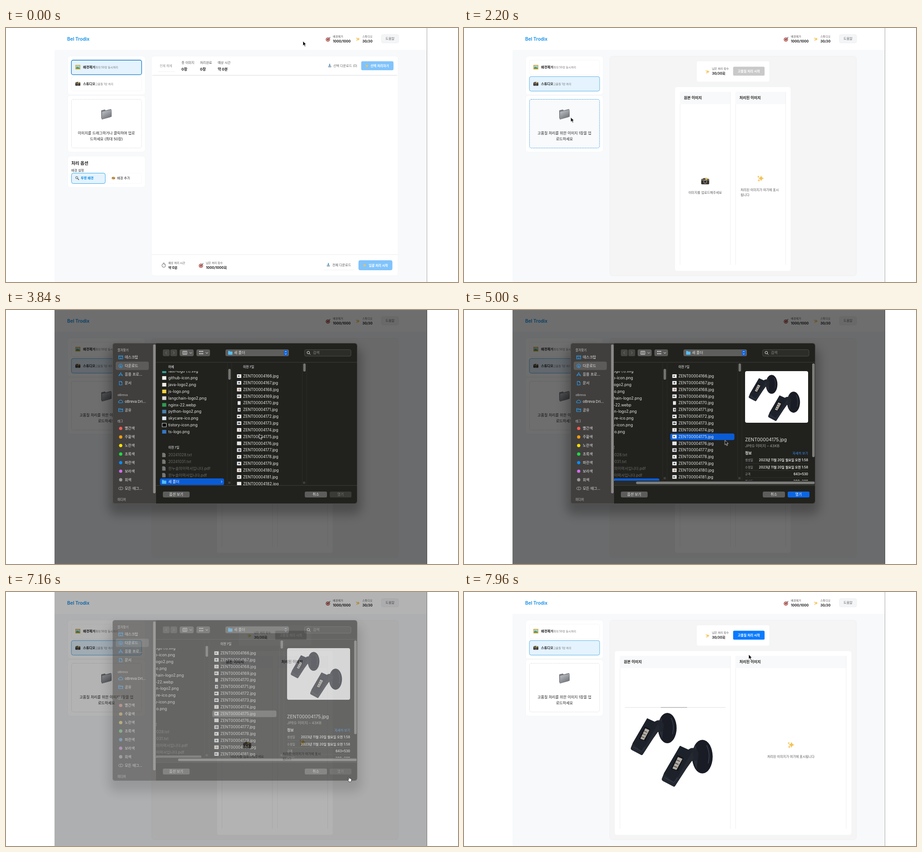
Recreate the animation shown at these times as an HTML page. Size 997x561 px, loop 8000 ms.

```html
<!DOCTYPE html>
<html lang="ko">
<head>
<meta charset="utf-8">
<style>
html,body{margin:0;width:100%;height:100%;overflow:hidden;background:#fff}
svg{display:block;width:997px;height:561px}
text{font-family:Inter,"Noto Sans CJK KR","Noto Sans CJK",sans-serif;white-space:pre}
.step{animation:8s step-end infinite}
.move{animation:8s linear infinite}
.first{animation-name:first}
.studio{animation-name:studio}
.narrow{animation-name:narrow}
.wide{animation-name:wide}
.hover{animation-name:hover}
.pressed{animation-name:pressed}
.picked{animation-name:picked}
.active{animation-name:active}
.idle{animation-name:idle}
.arrow{animation-name:arrow}
.hand{animation-name:hand}
.pointer{animation-name:pointer}
.dim{animation-name:dim}
.sheet{animation-name:sheet}
.slide{animation-name:slide}
@keyframes first{0%{opacity:1}20.5%,100%{opacity:0}}
@keyframes studio{0%{opacity:0}20.5%,100%{opacity:1}}
@keyframes narrow{0%{opacity:0}20.5%{opacity:1}93%,100%{opacity:0}}
@keyframes wide{0%{opacity:0}93%,100%{opacity:1}}
@keyframes hover{0%{opacity:0}24%{opacity:1}39%,100%{opacity:0}}
@keyframes pressed{0%{opacity:0}34%{opacity:1}39%,100%{opacity:0}}
@keyframes picked{0%{opacity:0}55.5%,100%{opacity:1}}
@keyframes active{0%{opacity:0}55.5%{opacity:1}87.5%,100%{opacity:0}}
@keyframes idle{0%{opacity:0}87.5%,100%{opacity:1}}
@keyframes arrow{0%{opacity:1}7.5%{opacity:0}9.5%{opacity:1}10.5%{opacity:0}13%{opacity:1}88.5%{opacity:0}92%,100%{opacity:1}}
@keyframes hand{0%{opacity:0}88.5%{opacity:1}92%,100%{opacity:0}}
@keyframes pointer{
0%,6%{transform:translate(655px,29px)}
7.5%{transform:translate(560px,8px)}
9.5%{transform:translate(478px,2px)}
10.5%{transform:translate(437px,1px)}
13%{transform:translate(400px,4px);animation-timing-function:ease-in-out}
19%,21.5%{transform:translate(215px,121px);animation-timing-function:ease-in-out}
26%{transform:translate(235.5px,197px)}
33%{transform:translate(235.5px,198px)}
36%,38%{transform:translate(239.5px,208px);animation-timing-function:ease-in-out}
46.5%,59%{transform:translate(558.5px,274px);animation-timing-function:ease-in-out}
75%{transform:translate(731px,411px)}
78%,86.5%{transform:translate(731.5px,414px);animation-timing-function:ease-out}
89.5%{transform:translate(754px,408.5px)}
92%,96.5%{transform:translate(765px,370px);animation-timing-function:ease-out}
99.5%,100%{transform:translate(628px,138px)}}
@keyframes dim{0%,34%{opacity:0}36%{opacity:.275}39%,88%{opacity:.57}89.5%{opacity:.3}91.2%,100%{opacity:0}}
@keyframes sheet{
0%,34%{opacity:0;transform:translateY(-13px)}
36%{opacity:.97;transform:translateY(-13px)}
39.5%,88%{opacity:1;transform:none}
89.5%{opacity:.51;transform:translateY(-11px)}
91.2%,100%{opacity:0;transform:translateY(-13px)}}
@keyframes slide{0%,56.5%{transform:none;animation-timing-function:ease-in-out}59.5%,100%{transform:translateX(-50px)}}
</style>
</head>
<body>
<svg viewBox="0 0 997 561">
<defs>
<linearGradient id="steel" x2=".6" y2="1"><stop stop-color="#c9ccd0"/><stop offset="1" stop-color="#6f7378"/></linearGradient>
<clipPath id="cols"><path d="M331 116H775V387H331Z"/></clipPath>
<path id="star" d="M0-5Q.7-.7 5 0Q.7.7 0 5Q-.7.7-5 0Q-.7-.7 0-5Z"/>
<g id="spark" fill="#f3c453"><use href="#star" x="1"/><use href="#star" transform="translate(-3.4-2.6)scale(.4)"/><use href="#star" transform="translate(-2.6 3.4)scale(.45)"/></g>
<g id="target"><circle cy="1" r="4.6" fill="#a83c38"/><circle cy="1" r="3.2" fill="#e8d4d0"/><circle cy="1" r="2.1" fill="#a83c38"/><path d="M0 1L4.500-3.500" stroke="#444"/><path d="M3-4L5.500-5L5-2.500Z" fill="#3a8fc4"/></g>
<g id="pic"><rect x="-5.500" y="-5" width="11" height="10" fill="#d9ab45"/><rect x="-4" y="-3.500" width="8" height="7" fill="#9fd3e8"/><path d="M-4 3.500V1L-1-1L4 1.500V3.500Z" fill="#5d9a4a"/></g>
<g id="cam"><path d="M-2.500-4H2.500L3.500-2.500H-3.500Z" fill="#55504a"/><rect x="-5.500" y="-3" width="11" height="7.500" rx="1" fill="#34312f"/><path d="M-5.500-1.500H5.500" stroke="#a69a82"/><circle cy="1" r="2.600" fill="#8b7f72"/><circle cy="1" r="1.500" fill="#28282c"/><use href="#star" transform="translate(1.500-3)scale(.4)" fill="#f7d24c"/></g>
<g id="folder"><path d="M-11-8L-3-10L-1-8L10-11L12-9V6L-9 12L-11 9Z" fill="#777b80"/><path d="M-9-5L12-9.500L9 7L-10 12Z" fill="url(#steel)"/></g>
<g id="lens" fill="none"><circle cx="-1" cy="-1" r="2.500" stroke="#555" fill="#cfe6f5"/><path d="M1 1L4 4" stroke="#444" stroke-width="1.300"/></g>
<g id="paint"><ellipse rx="4" ry="3" fill="#c99b55"/><circle cx="-1.500" cy="-1" r="1" fill="#3f8f55"/><circle cx="1.500" cy="1" r="1" fill="#c84a3c"/></g>
<g id="tray"><path d="M-4 1H4L3 4H-3Z" fill="#a8b4bd"/><path d="M-1-4H1V-1H2.500L0 2L-2.500-1H-1Z" fill="#5f9cc9"/></g>
<g id="watch" fill="none" stroke="#666"><circle cy=".5" r="4"/><path d="M0 .5L2-1.500M-1.500-5H1.500"/></g>
<g id="clip">
<ellipse cx="93.500" cy="46.500" rx="20.500" ry="33.500" fill="#191c25"/>
<path d="M80 22Q70 44 82 72Q86 46 80 22Z" fill="#272c37"/>
<path d="M102 24Q110 40 105 60" fill="none" stroke="#3a404e" stroke-width="1.500"/>
<path d="M64 34Q76 23 86 38L84 54L66 56Z" fill="#20242d"/>
<path d="M49 25L73 36L77 49L62 70L40 104Q38 108 34 105L15 95Q12 93 13 90L17 80Z" fill="#242831"/>
<path d="M49 25L73 36L38 99L17 80Z" fill="#1d212a"/>
<path d="M44 43L56 49L45 75L31 71Z" fill="#0f1218"/>
<path d="M45 47L54 51L42 73L34 70Z" fill="#b3aea5"/>
<path d="M42 53L49 56M39 59L46 62M36 65L43 68" stroke="#55504b" stroke-width="1.800"/>
<path d="M18 88L37 98L44 88" fill="none" stroke="#3b4150"/>
</g>
<g id="photo"><use href="#clip"/><use href="#clip" transform="translate(67 58)scale(1.110)"/></g>
</defs>
<g id="page"></g>
<rect class="move dim" x="107" width="822" height="561"/>
<g id="sheet" class="move sheet"></g>
<g class="move pointer">
<path class="step arrow" d="M0 0V10.200L2.400 8.100L4 12L5.800 11.200L4.200 7.500H7.200Z" stroke="#fff" stroke-width=".8"/>
<path class="step hand" d="M1 1Q2-.5 3 1L3.500 3.500Q5 2.500 6 4Q7.500 3.500 8 5V8Q7.500 10.500 6 11H3Q1 9 0 6.500Q0 5 2 6Z" fill="#fff" stroke="#111" stroke-width=".8"/>
</g>
</svg>
<script>
const B = 'font-weight="700"', MID = 'text-anchor="middle"', END = 'text-anchor="end"';
const T = (x, y, size, s, fill = '#222', more = '') =>
  `<text x="${x}" y="${y}" font-size="${size}" fill="${fill}" ${more}>${s}</text>`;
const R = (x, y, w, h, fill, r = 0, more = '') =>
  `<rect x="${x}" y="${y}" width="${w}" height="${h}" rx="${r}" fill="${fill}" ${more}/>`;
const U = (id, x, y, k = 1) => `<use href="#${id}" transform="translate(${x} ${y})scale(${k})"/>`;
const P = (d, stroke, w = 1, more = '') => `<path d="${d}" fill="none" stroke="${stroke}" stroke-width="${w}" ${more}/>`;
const G = (name, ...kids) => `<g class="step ${name}">${kids.join('')}</g>`;
const line = (c, w = 1) => `stroke="${c}" stroke-width="${w}"`;
const card = (x, y, w, h, r = 6) => R(x, y, w, h, '#fff', r, line('#f0f2f4', .7));

// Web page
const stat = (x, y, label, value) => T(x, y, 6.1, label, '#555') + T(x, y + 11, 7.4, value, '#222', B);
const total = (x, label, value) => T(x, 78.5, 7.2, label, '#555') + T(x, 93.5, 8.1, value, '#222', B);
const mode = (y, icon, name, note) =>
  U(icon, 158.5, y) + T(170, y + 2.8, 7.3, name, '#222', B) + T(197, y + 2.6, 6.1, note, '#777');
const picked = (y, c, w) => R(144.2, y, 155, 32.2, '#e4f3fe', 4, line(c, w));
const plain = y => R(144.5, y, 154.5, 32, '#fff', 4, line('#f3f4f6', .8));
const drop = (fill, c) => R(144.5, 157.5, 154.5, 107.5, fill, 4, line(c) + ' stroke-dasharray="2.2 1.4"');
const hint = (a, b) => T(221.5, 234.5, 8.1, a, '#222', MID) + T(221.5, 248, 8.1, b, '#222', MID);
const pane = (x, w, name) =>
  R(x, 141, w, 27, '#f8f9fa', 3) + P(`M${x + .5} 168V523M${x + w - .5} 141V523`, '#eeeff1') + T(x + 9, 157, 8.2, name, '#222', B);

const header = R(107, 0, 822, 560.5, '#f7f9fb') + R(107, 0, 822, 48.5, '#fff') +
  T(135, 28, 10.2, 'Bel Trodix', '#0d8de6', 'font-weight="600"') +
  U('target', 710, 24.5) + stat(721, 20.5, '배경제거', '1000/1000') +
  U('spark', 776, 24.5, .8) + stat(786, 20.5, '스튜디오', '30/30') +
  R(828, 14.5, 38, 18.5, '#f4f5f7', 4, line('#eaecef', .8)) + T(847, 26.3, 7.2, '도움말', '#666', MID);

const bulk = G('first',
  picked(71, '#1878c6', 1.3), plain(107),
  drop('#fff', '#d9dce0'), hint('이미지를 드래그하거나 클릭하여 업로', '드하세요 (최대 50장)'),
  card(136, 283, 171, 69), T(144, 302.3, 9.6, '처리 옵션', '#222', B), T(144, 316.6, 7.1, '배경 설정', '#333'),
  R(144.5, 320.5, 74.5, 23, '#e4f3fe', 4, line('#3aa8ea')), U('lens', 157, 331.5), T(165, 334, 7.2, '투명 배경', '#0d8de6', B),
  R(223, 320.5, 76, 23, '#fff', 4, line('#f5f6f7', .8)), U('paint', 237, 331.5), T(245, 334, 7.2, '배경 추가'),
  card(321, 62, 544, 485), P('M323 104.5H863', '#e3e5e8', 1.3),
  P('M336 96.500H372', '#f0f0f0'), T(339, 85.5, 7, '전체 해제', '#999'),
  total(387, '총 이미지', '0장'), total(428, '처리완료', '0장'), total(467, '예상 시간', '약 0분'),
  U('tray', 714, 83), T(722, 86, 7.1, '선택 다운로드 (0)', '#666'),
  R(783.5, 73.6, 71.2, 19.6, '#80c3fb', 3), U('spark', 796, 83.5, .7), T(804, 86, 7.1, '선택 처리하기', '#fff', B),
  P('M321 500.500H865', '#eceef0'),
  U('watch', 348, 524), stat(358, 520.5, '예상 처리 시간', '약 0분'),
  U('target', 430, 524), stat(441, 520.5, '남은 처리 횟수', '1000/1000회'),
  P('M702 534.500H768', '#f0f0f0'), U('tray', 711, 523), T(720, 526.2, 7.1, '전체 다운로드', '#555'),
  R(777.5, 513, 74.8, 22, '#80c3fb', 4), U('spark', 791, 524, .7), T(800, 526.5, 7.1, '일괄 처리 시작', '#fff', B));

const start = fill => R(593.6, 85.6, 69.4, 19.6, fill, 2.5) + T(628.2, 98.2, 7.1, '고품질 처리 시작', '#fff', B + MID);
const studio = G('studio',
  plain(71), picked(107.2, '#5eb1e4', 1),
  drop('#fff', '#d9dce0'), G('hover', drop('#f8fafc', '#3a9ee3')), G('pressed', drop('#e6f2fd', '#2f97e0')),
  hint('고품질 처리를 위한 이미지 1장을 업', '로드하세요'),
  R(321.5, 62.5, 544, 484.5, '#f5f5f5', 6, line('#eceef0', .8)),
  card(513, 73, 161, 46, 4), U('spark', 537, 96.5, .8), stat(547, 92.3, '남은 처리 횟수', '30/30회')) +
  G('narrow', start('#c9c9c9'), card(465, 130, 256, 407, 5),
    pane(476, 112, '원본 이미지'), pane(598.5, 111.5, '처리된 이미지'),
    U('cam', 532, 338, 1.6), T(532, 365.5, 7.1, '이미지를 업로드해주세요', '#555', MID),
    U('spark', 654, 332, 1.35), T(610, 359.5, 7.1, '처리된 이미지가 여기에 표시', '#555'), T(610, 370.5, 7.1, '됩니다', '#555')) +
  G('wide', start('#0a7bff'), card(332, 130, 523, 407, 5),
    pane(343.5, 244.5, '원본 이미지'), pane(598.5, 245, '처리된 이미지'),
    P('M355 255H577', '#dcdcdc'), P('M434 255H492', '#999'), U('photo', 355, 254),
    U('spark', 721, 337.5, 1.35), T(721, 365.5, 7.1, '처리된 이미지가 여기에 표시됩니다', '#555', MID));

document.getElementById('page').innerHTML = header +
  card(136, 62, 171, 85.5) + card(136, 149, 171, 125) + bulk + studio +
  mode(86.5, 'pic', '배경제거', '최대 50장 동시처리') + mode(123, 'cam', '스튜디오', '고품질 1장 처리') +
  U('folder', 221, 190) + P('M928.500 0V561', '#a5a5a5');

// File dialog
const BG = '#21211e', INK = '#e8e8e6', BLUE = '#0a5cd5', SKY = '#2f9bf0', ROW = 14.85, TAG = 18.9;
const side = (y, s) => T(262, y + 2.9, 8, s, INK);
const group = (y, s) => T(246, y + 2.4, 6.6, s, '#9a9a98', B);
const glyph = (y, d) => P(d, SKY, 1.1, `transform="translate(253 ${y})"`);
const tags = [['빨간색', '#ff5a52'], ['주황색', '#f59d0a'], ['노란색', '#ffe000'], ['초록색', '#1fdc45'],
  ['파란색', '#0a8cff'], ['보라색', '#d66bf5'], ['회색', '#9a9a9a']];
const dot = (i, c) => `<circle cx="253" cy="${261.5 + i * TAG}" r="3.600" fill="${c}"/>`;
const dir = (x, y) => `<path d="M${x} ${y - 4}h3.500l1 1.200h5v7h-9.500z" fill="#55bdf5"/>`;
const button = (x, w, s, fill = '#5d5d5b', c = INK) => R(x, 401, w, 13, fill, 3) + T(x + w / 2, 410.3, 7.8, s, c, MID);

const sidebar = '<path d="M331 73H241Q235 73 235 79V422Q235 428 241 428H331Z" fill="#403f3d"/>' +
  group(89, '즐겨찾기') + R(242, 114, 73, 18.5, '#5c5b59', 4) +
  side(104.5, '데스크탑') + glyph(104.5, 'M-4.500-3.500H4.500V3.500H-4.500ZM-4.500-1.500H4.500M-2 2H2') +
  side(123.5, '다운로드') + glyph(123.5, 'M-4 0A4 4 0 1 0 4 0A4 4 0 1 0-4 0M0-2V2L-1.500.5M0 2L1.500.5') +
  side(142.5, '응용 프로…') + glyph(142.5, 'M-4 3.500L0-4L4 3.500M-4.500 1H4.500') +
  side(161.5, '문서') + glyph(161.5, 'M-3-4H1L3-2V4H-3ZM1-4V-2H3') +
  group(187.5, 'oBreva') + side(202, 'oBreva Dri…') + glyph(202, 'M-3 3A2 2 0 0 1-3-1A3 3 0 0 1 2.500-1.500A2.300 2.300 0 0 1 3 3Z') +
  side(221, '공유') + glyph(221, 'M-4.500 3.500V-3.500H-1L0-2.500H4.500V3.500ZM-4.500-.5H4.500') +
  group(245.5, '태그') +
  tags.map(([s, c], i) => dot(i, c) + side(261.5 + i * TAG, s)).join('') +
  G('idle', ...tags.map((t, i) => dot(i, '#8a8a8899'))) +
  P('M251.500 391H255A3 3 0 0 1 255 397H251.500A3 3 0 0 1 251.500 391M253 391V397', '#aaa', .9) + side(394, '모든 태그…') +
  group(418.5, '미디어') + R(324.5, 76, 5.5, 329, '#8b8a88', 2.7);

const toolbar =
  R(346, 87, 15, 15, '#454542', 3) + R(362.5, 87, 15, 15, '#454542', 3) +
  P('M355 91.500L352 94.500L355 97.500M368.500 91.500L371.500 94.500L368.500 97.500', '#7c7c7a') +
  R(383, 87, 31, 15, '#5a5a58', 3.5) + P('M390 91H399V98H390ZM393 91V98M396 91V98M405 93.500L407.500 96L410 93.500', INK, .9) +
  R(420, 87, 30, 15, '#5a5a58', 3.5) + P('M426 91.500H435M426 96.500H435', INK, 2.2, 'stroke-dasharray="2.300 1"') + P('M440.500 93.500L443 96L445.500 93.500', INK) +
  R(484, 87, 140, 15, '#5e5e5c', 3.5) + dir(490, 94.5) + T(503, 97.4, 8, '새 폴더', INK) +
  R(613, 88.5, 8, 12, '#0b62dd', 2.5) + G('idle', R(613, 88.5, 8, 12, '#5e5e5c', 2.5)) +
  P('M615 93L617 91L619 93M615 96L617 98L619 96', '#fff', .9) +
  R(658.5, 87.5, 102.5, 14.5, '#2c2c29', 3.5, line('#555552', .8)) +
  P('M664 94A2.800 2.800 0 1 1 669.600 94A2.800 2.800 0 1 1 664 94M669 96.200L671.500 98.500', INK) +
  T(677, 97.4, 8, '검색', '#8a8a88');

const files = [['fast-logo (1).svg', '#2fa596'], ['github-icon.png', '#f4f4f4'], ['java-logo2.png', '#f1ece8'], ['js-logo.png', '#f3d43a'],
  ['langchain-logo2.png', '#d9dcd9'], ['nginx-22.webp', '#2e9c4f'], ['python-logo2.png', '#4a7fae'], ['skycare-ico.png', '#dce8ee'],
  ['tistory-icon.png', '#000'], ['ts-logo.png', '#3577c4']];
const docs = ['20241028.txt', '20241031.txt', '한누솔의이력서입니다.pdf', '한누솔이력서입니다.pdf'];
const tints = ['#333', '#667', '#ddd', '#555', '#b98', '#456'];

const leftCol = files.map(([s, c], i) => {
    const y = 135.3 + i * ROW;
    return R(344.5, y - 4, 9, 8, c, 0, i === 8 ? line('#eee', .9) : '') + T(358, y + 3, 8.6, s, INK);
  }).join('') + T(358, 306, 6.8, '이전 7일', '#bbb', B) +
  docs.map((s, i) => {
    const y = 320 + i * ROW;
    return `<path d="M344.500 ${y - 4.500}h5l2.500 2.500v7h-7.500z" fill="#777775"/>` + T(358, y + 3, 8.4, s, '#6b6b69');
  }).join('') +
  R(339.5, 372, 141.5, 14.5, BLUE, 3.5) + G('idle', R(339.5, 372, 141.5, 14.5, '#5c5c5a', 3.5)) +
  dir(344, 379.5) + T(358, 382, 8, '새 폴더', '#fff') + P('M474.500 377L476.500 379.300L474.500 381.500', '#fff', .9);

const photos = G('active', R(505, 272.8, 141.5, 14.5, BLUE, 3.5)) + G('idle', R(505, 272.8, 141.5, 14.5, '#5c5c5a', 3.5)) +
  Array.from({length: 17}, (_, i) => {
    const y = 146 + i * ROW, tall = i === 4 || i === 5;
    return R(tall ? 511 : 509.5, y - 4, tall ? 6.5 : 9.5, 8, '#eee') +
      `<ellipse cx="${513.5 + i * 7 % 3 * .6}" cy="${y}" rx="${1.5 + i * 5 % 4 * .5}" ry="${1.3 + i % 3 * .5}" fill="${tints[i * 5 % 6]}"/>` +
      T(523, y + 3, 8.6, `ZENT0000${4166 + i}.jpg`, INK);
  }).join('');

const fact = (y, k, v) => T(670, y, 6.4, k, '#aaa') + T(809, y, 7.1, v, INK, 'font-weight="600"' + END) + P(`M670 ${y + 5}H809`, '#373733', .7);
const preview = G('picked',
  R(670, 135, 139, 114, '#fff', 4), U('photo', 670, 135, .626),
  T(670, 290, 10.2, 'ZENT00004175.jpg', INK), T(670, 303.4, 8.2, 'JPEG 이미지 – 43KB', '#a5a5a3'),
  T(670, 319, 8, '정보', INK, B), T(809, 319, 7, '자세히 보기', '#3a8ff5', END),
  fact(334, '생성일', '2023년 11월 20일 월요일 오전 1:58'), fact(349.5, '수정일', '2023년 11월 20일 월요일 오전 1:58'),
  fact(365, '규격', '643×530'), fact(380.5, '해상도', '300×300'));

const grips = y => P(`M491.500 ${y}v5M494 ${y}v5M656.500 ${y}v5M659 ${y}v5`, '#777775', .8);
const columns = `<g clip-path="url(#cols)"><g class="move slide">` + leftCol + photos +
  R(331, 116, 322, 19, BG) + T(358, 128, 6.8, '어제', '#bbb', B) + T(523, 128, 6.8, '이전 7일', '#bbb', B) +
  P('M488 116V387M498 116V387M653.500 116V387M663 116V387', '#31312d', .8) +
  R(490.3, 130, 5.4, 24, '#73736f', 2.7) + R(655.6, 118, 5.4, 18, '#73736f', 2.7) +
  grips(379) + preview + '</g>' +
  G('picked', R(331, 377, 444, 10, '#2a2a27'), R(379.5, 379, 394, 5.5, '#7d7d7b', 2.7), R(768, 118, 5.5, 207, '#7d7d7b', 2.7),
    `<g transform="translate(-50-10)">${grips(379)}</g>`) + '</g>';

document.getElementById('sheet').innerHTML =
  R(226, 82, 558, 370, '#000', 18, 'opacity=".26" style="filter:blur(11px)"') +
  R(235, 73, 540, 355, BG, 6) + columns + sidebar + toolbar +
  P('M331 115.500H775M331 387.500H775', '#3b3b37') +
  button(346, 59, '옵션 보기') + button(659, 49, '취소') + button(714, 48, '열기', '#3a3a37', '#777775') +
  G('active', button(714, 48, '열기', '#0b66e4', '#fff')) +
  R(235.3, 73.3, 539.4, 354.4, 'none', 6, line('#6a6a68', .6));
</script>
</body>
</html>
```
